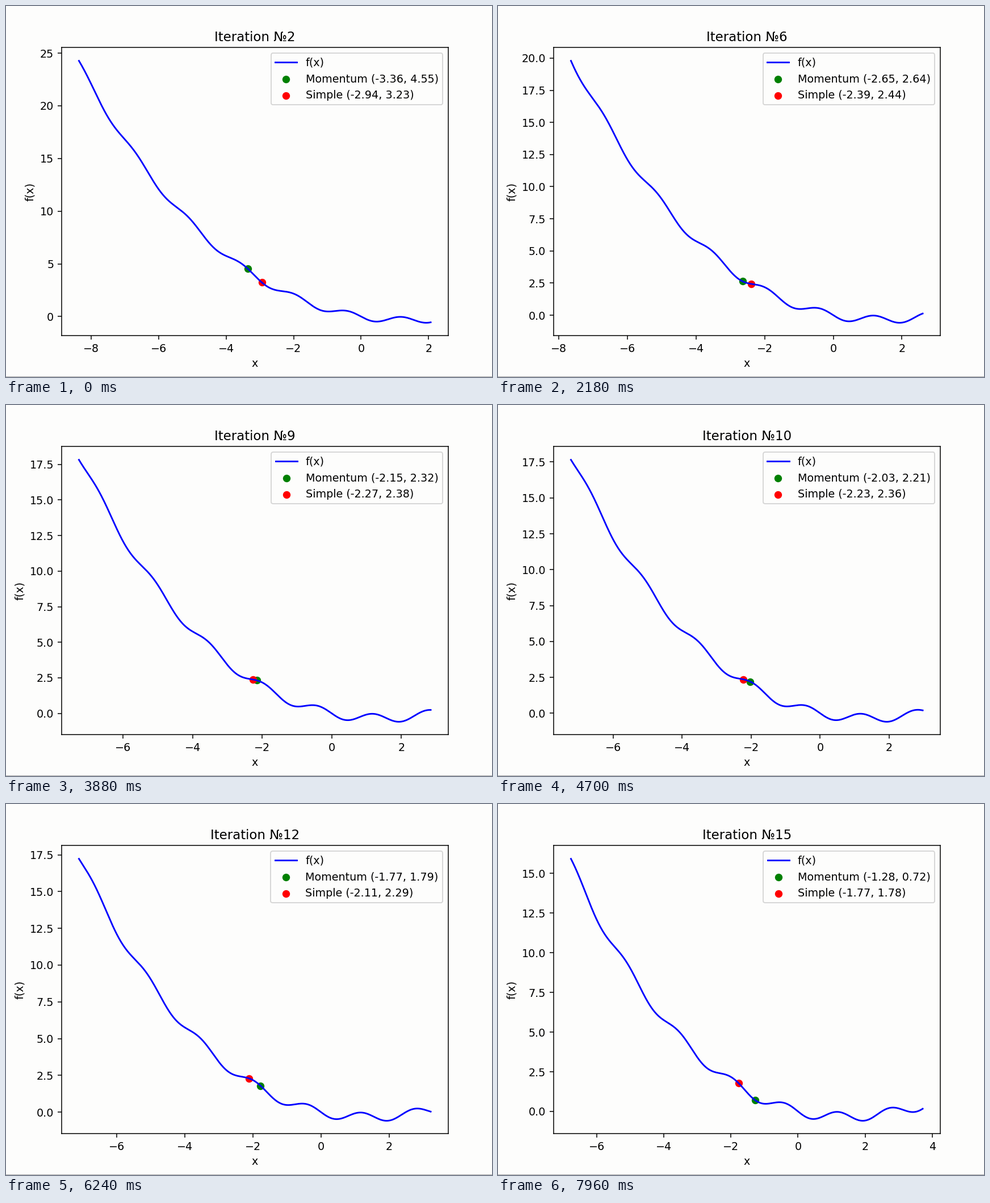
Animation, 856 px wide and 654 px high, one loop 8000 ms. Source, as a matplotlib script:

```python
import matplotlib.pyplot as plt
import numpy as np
from matplotlib.animation import FuncAnimation
from matplotlib.lines import Line2D

W, H, DPI = 856, 654, 137.4
FRAMES, INTERVAL = 200, 40
FIRST, LAST = 2, 15
START, RATE, BETA = -3.5, 0.1, 0.8
PAPER = "#fdfdfc"


def f(x):
    return -0.01 * x**3 + 0.2 * x**2 - 0.5 * x - 0.3 * np.sin(4 * x)


def slope(x):
    return -0.03 * x**2 + 0.4 * x - 0.5 - 1.2 * np.cos(4 * x)


def descend(beta):
    """Positions of gradient descent with averaged velocity; beta=0 is plain."""
    x, v, path = START, 0.0, [START]
    for _ in range(LAST):
        v = beta * v + (1 - beta) * slope(x)
        x -= RATE * v
        path.append(x)
    return path


momentum, simple = descend(BETA), descend(0)

# Each iteration lasts slightly longer than the one before it.
k = np.arange(LAST - FIRST)
step_times = 120 + 618 * k + 1.4 * k**2

plt.rcParams["font.family"] = "DejaVu Sans"
fig = plt.figure(figsize=((W + 1e-6) / DPI, (H + 1e-6) / DPI), dpi=DPI,
                 facecolor=PAPER)
ax = fig.add_axes([97.5 / W, 72.5 / H, 681.5 / W, 508 / H], facecolor=PAPER)
fig.add_artist(Line2D([0, 1], [0.5 / H] * 2, color="#a6a6a6",
                      linewidth=72 / DPI))

curve, = ax.plot([], [], color="blue", label="f(x)")
dots = [ax.scatter([0], [0], color=c, label=name)
        for c, name in (("green", "Momentum"), ("red", "Simple"))]
ax.set_xlabel("x")
ax.set_ylabel("f(x)")
title = ax.set_title("Iteration")
legend = ax.legend(loc="upper right")
legend.get_frame().set_facecolor(PAPER)


def padded(values):
    lo, hi = values.min(), values.max()
    pad = 0.05 * (hi - lo)
    return lo - pad, hi + pad


def update(frame):
    n = FIRST + int(np.sum(step_times <= frame * INTERVAL))
    points = momentum[n], simple[n]
    xs = np.linspace(min(points) - 5, max(points) + 5, 500)
    ys = f(xs)
    curve.set_data(xs, ys)
    ax.set_xlim(*padded(xs))
    ax.set_ylim(*padded(ys))
    for x, dot, text in zip(points, dots, legend.get_texts()[1:]):
        dot.set_offsets([[x, f(x)]])
        text.set_text(f"{dot.get_label()} ({x:.2f}, {f(x):.2f})")
    title.set_text(f"Iteration №{n}")
    return [curve, title, legend, *dots]


anim = FuncAnimation(fig, update, frames=FRAMES, interval=INTERVAL,
                     init_func=lambda: update(0), repeat=True, repeat_delay=0)
plt.show()
```
